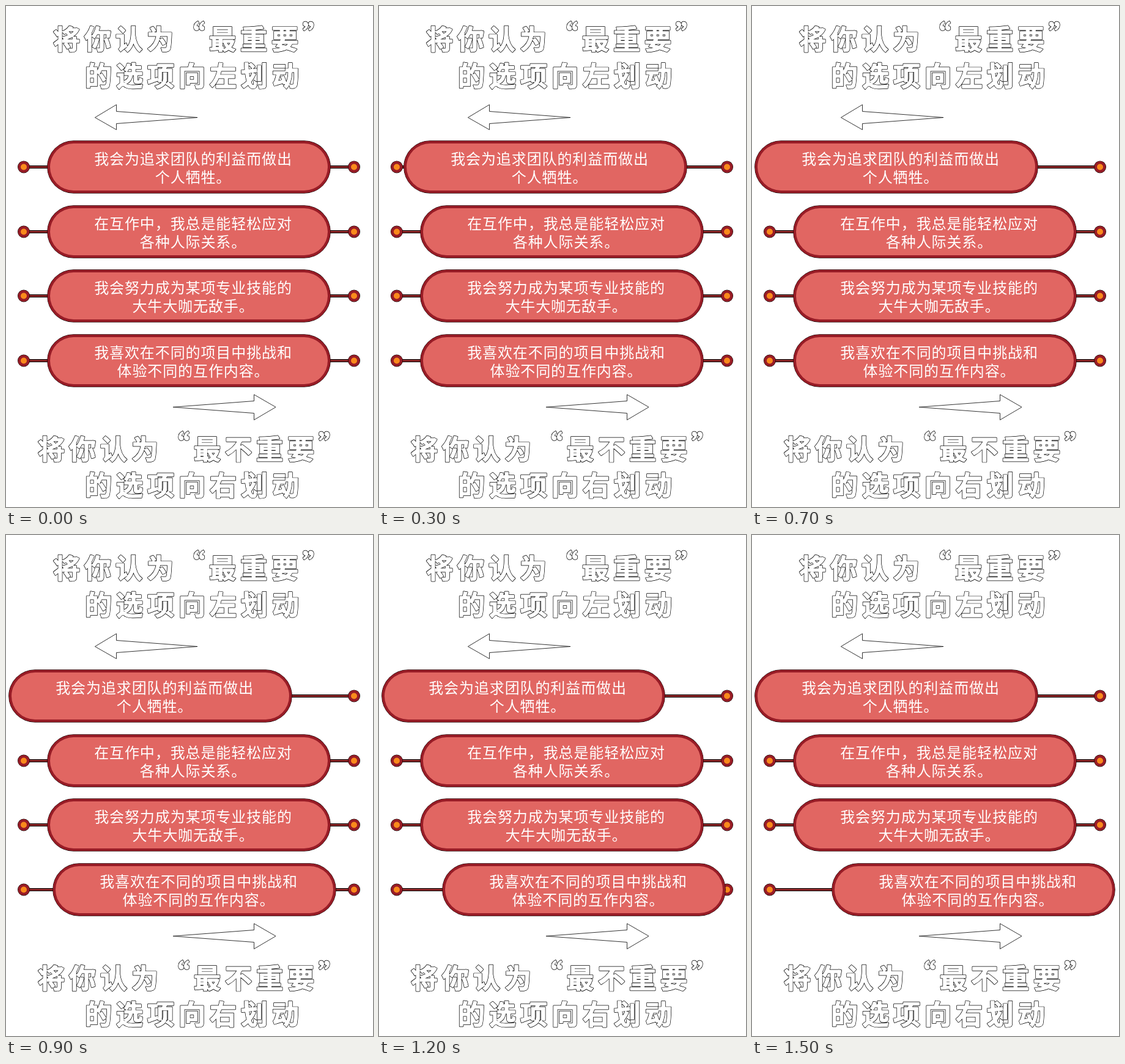
An HTML page that plays this animation: 600x820 px, repeating every 2 s.

```html
<!DOCTYPE html>
<html lang="zh-CN">
<head>
<meta charset="utf-8">
<title>选项划动</title>
<style>
  html, body { margin: 0; width: 100%; height: 100%; overflow: hidden; background: #fff; }
  svg { display: block; width: 600px; height: 820px; }
  text { font-family: "Noto Sans CJK SC", "Noto Sans CJK", sans-serif; white-space: pre; }
  .title { font-size: 44px; font-weight: 700; letter-spacing: 7px; stroke-linejoin: round; fill: #fff; }
  .edge { stroke: #000; stroke-width: 2.6; }
  .face { stroke: #fff; stroke-width: 1.2; }
  .option { font-size: 24px; letter-spacing: 0.9px; font-weight: 300; fill: #fff; text-anchor: middle; }
  .arrow { fill: #fff; stroke: #000; stroke-width: 0.8; }
</style>
</head>
<body>
<svg id="stage" viewBox="0 0 600 820">
  <path class="arrow" d="M145.5 182.5L180.5 161.5V172.5L313 182.5L180.5 192.5V202.5Z"/>
  <path class="arrow" d="M441 656.5L405.5 636V646.5L273 656.5L405.5 666.5V677.5Z"/>
</svg>
<script>
const stage = document.getElementById('stage');
const DARK = '#981c26', ROD = '#8c2728', RED = '#e16662', ORANGE = '#f98a1c';

function add(parent, tag, attrs, text = '') {
  const node = document.createElementNS('http://www.w3.org/2000/svg', tag);
  for (const key in attrs) node.setAttribute(key, attrs[key]);
  node.textContent = text;
  return parent.appendChild(node);
}

// Bubble lettering: a black stroke under a narrower white one, with raised quotes.
function title(text, x, y) {
  for (const layer of ['edge', 'face']) {
    const line = add(stage, 'text', { class: 'title ' + layer, x, y });
    let raised = false;
    for (const part of text.split(/([“”])/).filter(Boolean)) {
      const quote = /[“”]/.test(part);
      add(line, 'tspan', { dy: quote === raised ? 0 : quote ? -7 : 7 }, part);
      raised = quote;
    }
  }
}

function pill(parent, y, inset, fill) {
  const height = 87 - 2 * inset;
  add(parent, 'rect', {
    x: 67 + inset, y: y - 43.5 + inset, width: 464 - 2 * inset, height, rx: height / 2, fill
  });
}

function optionRow(lines, index) {
  const y = 263.5 + Math.round(index * 105.67);
  add(stage, 'rect', { x: 29, y: y - 2.5, width: 540, height: 5, fill: '#000' });
  add(stage, 'rect', { x: 29, y: y - 1.5, width: 540, height: 3, fill: ROD });
  for (const cx of [29, 569]) {
    for (const [r, fill] of [[10, '#000'], [9.4, DARK], [5, ORANGE]])
      add(stage, 'circle', { cx, cy: y, r, fill });
  }
  const slider = add(stage, 'g', {});
  pill(slider, y, 0.2, '#000');
  pill(slider, y, 0.7, DARK);
  pill(slider, y, 5, RED);
  lines.forEach((line, i) =>
    add(slider, 'text', { class: 'option', x: 306, y: y - 5 + i * 30.5 }, line));
  return slider;
}

title('将你认为“最重要”', 77, 70.5);
title('的选项向左划动', 129, 130.5);
title('将你认为“最不重要”', 52, 741.5);
title('的选项向右划动', 129, 801);

const sliders = [
  ['我会为追求团队的利益而做出', '个人牺牲。'],
  ['在互作中，我总是能轻松应对', '各种人际关系。'],
  ['我会努力成为某项专业技能的', '大牛大咖无敌手。'],
  ['我喜欢在不同的项目中挑战和', '体验不同的互作内容。']
].map(optionRow);

// Seven hard 9px steps, one every 100 ms.
const slide = (t, start) => 9 * Math.max(0, Math.min(7, Math.floor((t - start) / 100)));

const begin = performance.now();
function draw(now) {
  const t = Math.max(0, now - begin) % 2000;
  sliders[0].setAttribute('transform', `translate(${-slide(t, 0)} 0)`);
  sliders[3].setAttribute('transform', `translate(${slide(t, 800)} 0)`);
  requestAnimationFrame(draw);
}
draw(begin);
</script>
</body>
</html>
```
